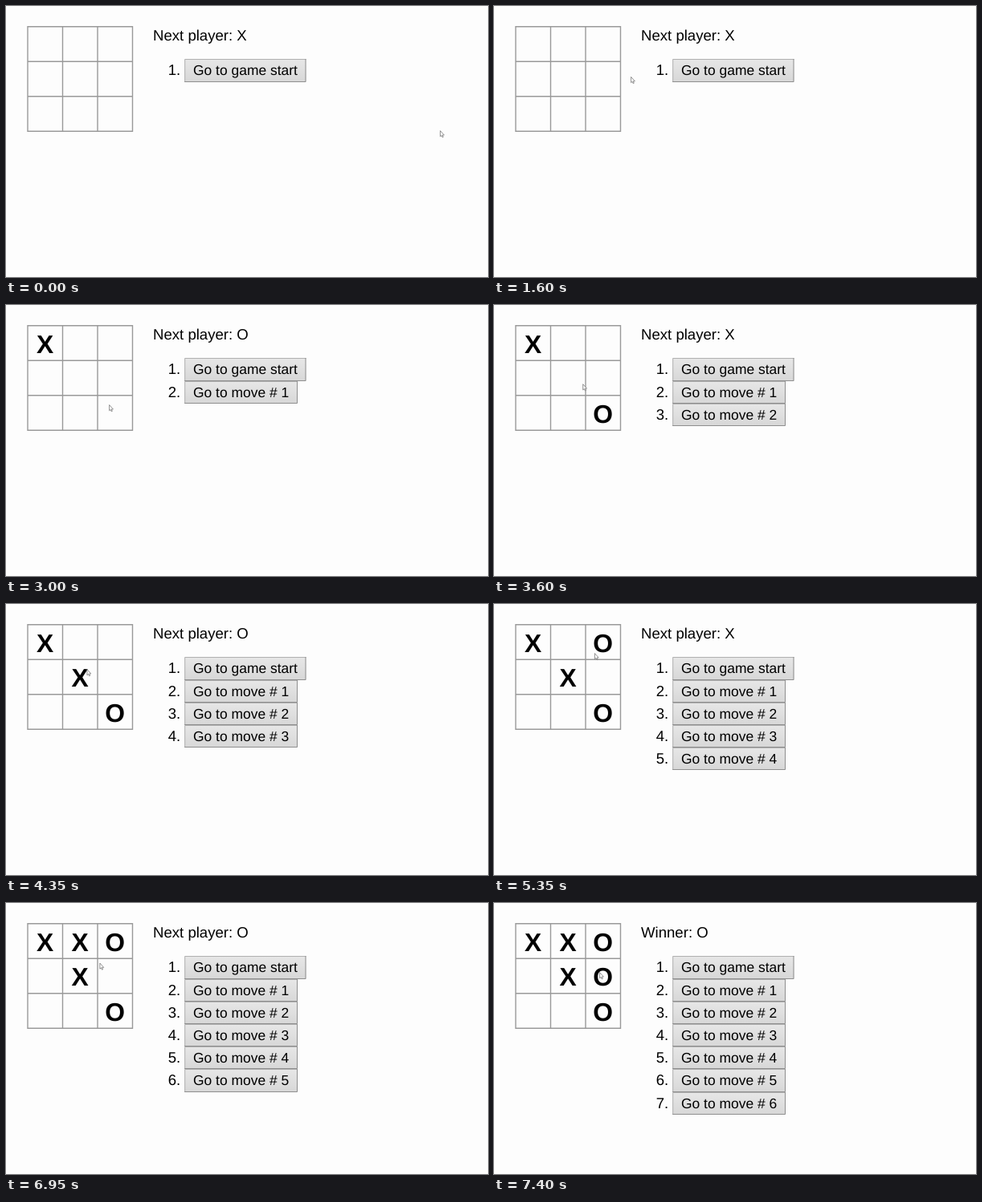
These frames come from a looping animation (600 px wide and 338 px high, 8000 ms). An HTML page:

```html
<!DOCTYPE html>
<html lang="en">
<head>
<meta charset="utf-8">
<title>Tic-tac-toe</title>
<style>
  html, body { margin: 0; width: 100%; height: 100%; overflow: hidden; background: #fdfdfd; }
  svg { display: block; width: 100%; height: 100%; }
  text { font: 18.6px "Liberation Sans", Arial, sans-serif; fill: #000; text-rendering: geometricPrecision; }
  .mark { font-size: 31.8px; font-weight: bold; text-anchor: middle; }
  .number { text-anchor: end; }
  .label { font-size: 17.45px; }
  .grid { fill: none; stroke: #999; stroke-width: 1.4; }
  .light { fill: none; stroke: #b0b0b0; }
  .dark { fill: none; stroke: #8e8e8e; }
  .cursor { fill: #fff; stroke: #777; stroke-width: .8; }
</style>
</head>
<body>
<svg viewBox="0 0 600 338">
  <defs>
    <linearGradient id="face" x2="0" y2="1">
      <stop offset="0" stop-color="#e7e7e7"/>
      <stop offset="1" stop-color="#d7d7d7"/>
    </linearGradient>
  </defs>
  <path class="grid" d="M27 25.8H157.5V156.3H27ZM70.5 25.8V156.3M114 25.8V156.3M27 69.3H157.5M27 112.8H157.5"/>
  <text id="status" x="183" y="43.3"></text>
  <g id="marks"></g>
  <g id="history"></g>
  <path id="cursor" class="cursor" d="M.6 .6V7.8L2.1 6.4 3.2 8.8 4.3 8.4 3.3 6H5.4Z"/>
</svg>
<script>
const LOOP = 8000, TICK = 50;
const clicks = [[2100, 0], [3100, 8], [4000, 4], [4850, 2], [6050, 1], [7400, 5]]; // time, cell
const rest = [540, 155];
const glides = [ // start, end, x, y
  [450, 750, 406, 143],
  [1250, 1400, 177, 90],
  [1550, 1950, 59, 53],
  [2200, 3000, 128, 124],
  [3250, 3850, 99, 82],
  [4300, 4750, 126, 61],
  [5300, 5800, 98, 60],
  [6600, 7250, 131, 86]
];

const byId = id => document.getElementById(id);
const player = i => i % 2 ? 'O' : 'X';

function add(parent, tag, attrs, content = '') {
  const node = document.createElementNS('http://www.w3.org/2000/svg', tag);
  for (const key in attrs) node.setAttribute(key, attrs[key]);
  node.textContent = content;
  return parent.appendChild(node);
}

function addRow(i) {
  const row = add(byId('history'), 'g', {});
  const top = Math.round(66.4 + 28.2 * i), bottom = Math.round(66.4 + 28.2 * (i + 1));
  const right = i ? 363 : 373.5, left = 222.2, base = 86.3 + 28.2 * i;
  add(row, 'rect', { x: left, y: top, width: right - left, height: bottom - top, fill: 'url(#face)' });
  add(row, 'path', { class: 'light', d: `M${left + .5} ${bottom}V${top + .5}H${right}` });
  add(row, 'path', { class: 'dark', d: `M${left} ${bottom - .5}H${right - .5}V${top}` });
  add(row, 'text', { class: 'number', x: 217.2, y: base }, `${i + 1}.`);
  add(row, 'text', { class: 'label', x: 233, y: base }, i ? `Go to move # ${i}` : 'Go to game start');
  return row;
}

const rows = [0, ...clicks].map((_, i) => addRow(i));
const marks = clicks.map(([, cell], i) => add(byId('marks'), 'text', {
  class: 'mark',
  x: 48.7 + 43.5 * (cell % 3),
  y: 59.7 + 43.6 * Math.floor(cell / 3)
}, player(i)));

const ease = p => .8 * p * p * (3 - 2 * p) + .2 * p;

function cursorAt(t) {
  let [x, y] = rest;
  for (const [start, end, toX, toY] of glides) {
    if (t <= start) break;
    const p = ease(Math.min(1, (t - start) / (end - start)));
    x += (toX - x) * p;
    y += (toY - y) * p;
  }
  return [x, y];
}

const show = (node, on) => node.setAttribute('visibility', on ? 'visible' : 'hidden');

function draw(t) {
  const count = clicks.filter(([time]) => t >= time).length;
  marks.forEach((mark, i) => show(mark, i < count));
  rows.forEach((row, i) => show(row, i <= count));
  byId('status').textContent = count === clicks.length
    ? `Winner: ${player(count - 1)}`
    : `Next player: ${player(count)}`;
  byId('cursor').setAttribute('transform', `translate(${cursorAt(t)})`);
}

const origin = performance.now();
function frame(now) {
  const t = Math.max(0, now - origin) % LOOP;
  draw(Math.floor(t / TICK) * TICK);
  requestAnimationFrame(frame);
}
draw(0);
requestAnimationFrame(frame);
</script>
</body>
</html>
```
